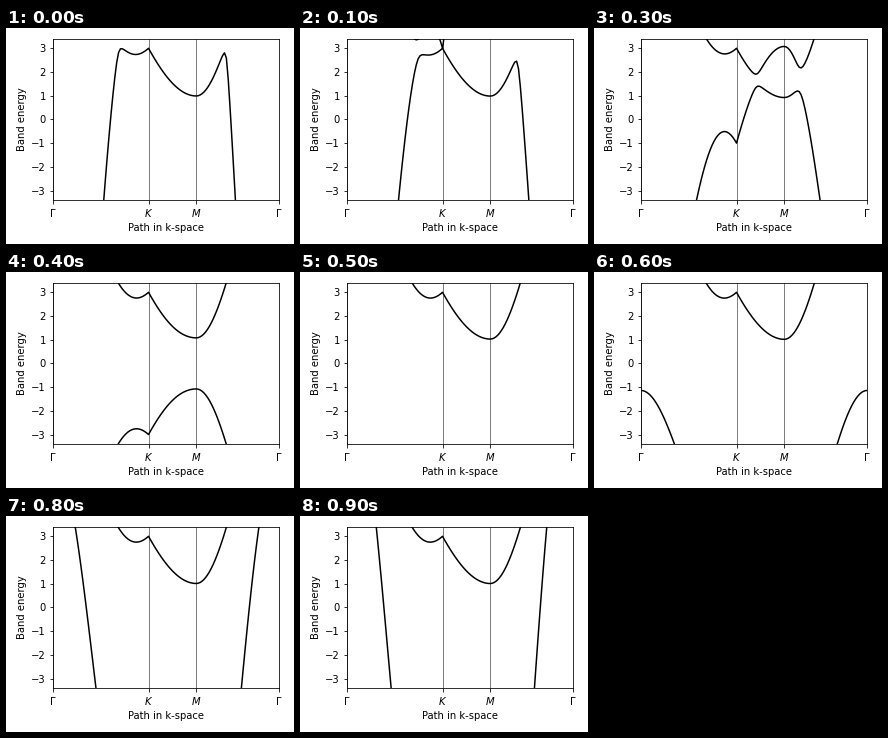
Recreate the animation shown at these times as a matplotlib script. Size 288x216 px, loop 1 s.

```python
import matplotlib.pyplot as plt
import numpy as np
from matplotlib.animation import FuncAnimation

WIDTH, HEIGHT, DPI = 288, 216, 72
LEFT, RIGHT, BOTTOM, TOP = 47, 273, 44, 205.2
FRAMES, INTERVAL = 10, 100
N_K = 121
COUPLING = 0.4

plt.rcParams.update({"font.family": "DejaVu Sans", "font.size": 10,
                     "mathtext.fontset": "dejavusans"})


def k_path():
    """Sample Gamma-K-M-Gamma in reduced coordinates of a hexagonal lattice."""
    corners = np.array([[0, 0], [2 / 3, 1 / 3], [1 / 2, 1 / 2], [0, 0]])
    nodes = np.cumsum([0, 1, 0.5, np.sqrt(3) / 2])
    nodes /= nodes[-1]
    index = np.rint(nodes * (N_K - 1))
    steps = np.arange(N_K)
    k1, k2 = (2 * np.pi * np.interp(steps, index, c) for c in corners.T)
    return k1, k2, np.interp(steps, index, nodes), nodes


K1, K2, DIST, NODES = k_path()


def bands(step):
    """Eigenvalues of a two-orbital model whose second hopping is swept."""
    hop = np.cos(K1) + np.cos(K2)
    first = 5 + 2 * hop
    second = -5 + (2 * step - 10) * hop
    mixing = COUPLING * np.abs(1 + np.exp(1j * K1) + np.exp(1j * K2))
    mean = (first + second) / 2
    split = np.hypot((first - second) / 2, mixing)
    return mean - split, mean + split


fig = plt.figure(figsize=(WIDTH / DPI, HEIGHT / DPI), dpi=DPI, facecolor="white")
ax = fig.add_axes([LEFT / WIDTH, BOTTOM / HEIGHT,
                   (RIGHT - LEFT) / WIDTH, (TOP - BOTTOM) / HEIGHT])
ax.set_xlim(0, NODES[-1])
ax.set_ylim(-3.4, 3.4)
ax.set_xticks(NODES, [r"$\Gamma $", "$K$", "$M$", r"$\Gamma $"])
ax.set_yticks(range(-3, 4))
ax.set_xlabel("Path in k-space")
ax.set_ylabel("Band energy")
for node in NODES:
    ax.axvline(node, color="black", linewidth=0.5)

lines = [ax.plot(DIST, energy, color="black", linewidth=1.5)[0]
         for energy in bands(0)]


def draw(step):
    for line, energy in zip(lines, bands(step)):
        line.set_ydata(energy)
    return lines


animation = FuncAnimation(fig, draw, frames=FRAMES, interval=INTERVAL,
                          init_func=lambda: draw(0), repeat=True, repeat_delay=0)
plt.show()
```
